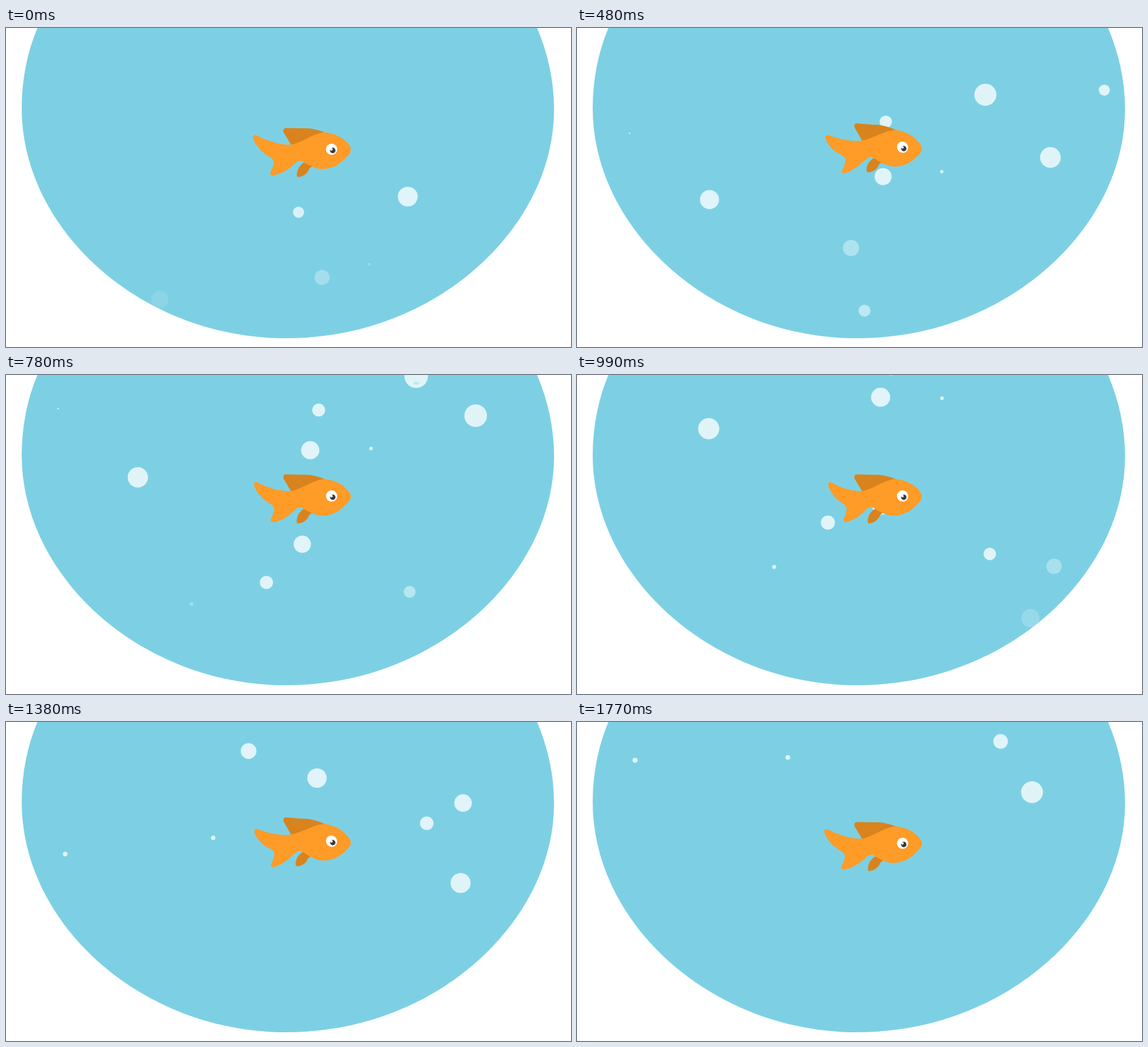
These frames come from a looping animation (900 by 509 pixels, 1800 ms). An HTML page without scripts:

```html
<!DOCTYPE html>
<html lang="en">
<head>
<meta charset="utf-8">
<title>Goldfish bowl</title>
<style>
  @property --t {
    syntax: "<number>";
    inherits: true;
    initial-value: 0;
  }

  html, body {
    margin: 0;
    width: 100%;
    height: 100%;
    overflow: hidden;
    background: #fff;
  }

  /* --t is the clock in ms; every position below is a function of it */
  svg {
    display: block;
    width: 100%;
    height: 100%;
    animation: clock 1800ms steps(60) -2ms infinite;
  }
  @keyframes clock { from { --t: 0 } to { --t: 1800 } }

  /* Bubbles: a steady rise (v) plus a sideways push (a, c) that dies away.
     s = time at which r and o hold, x/y = resting line, k = decay time */
  .bubbles > * {
    --k: 380;
    --age: calc(var(--t) - var(--s));
    --push: exp(-1 * var(--age) / var(--k));
    cx: calc(1px * (var(--x) + var(--a) * var(--push)));
    cy: calc(1px * (var(--y) - var(--v) * var(--age) + var(--c) * var(--push)));
  }
  .bubbles circle {
    fill: #fff;
    r: calc(1px * var(--r) * (1 + .00066 * var(--v) * var(--age)));
    opacity: clamp(0, var(--o) + .00625 * var(--v) * var(--age), .76);
  }
  .glint {
    fill: #c3e8f1;
    transform: translateY(11px);
    opacity: clamp(0, (var(--t) - 750) / 30, 1);
  }

  /* Fish: the middle lifts (--lift) while nose and tail tip hold; the tail sways */
  .fish {
    --lift: calc(3.5 - 3.5 * cos(6.2832 * (var(--t) / 900 + .02)));
    --beat: calc(var(--t) / 450 + .14 * sin(3.1416 * var(--t) / 1800));
    --sway: calc(4.25 - 4.25 * cos(6.2832 * var(--beat)));
    --sx: calc(1 - var(--sway) / 62);
    fill: #ff9b27;
  }
  .body, .tail { transform-origin: 0 0; }
  .body {
    transform: matrix(1, calc(.0085 * var(--lift)), 0, 1, 0, calc(-4.875 * var(--lift)));
  }
  .tail {
    transform: matrix(var(--sx), calc(-.01625 * var(--lift)), 0, 1,
      calc(455 * (1 - var(--sx))), calc(6.386 * var(--lift)));
  }
  .fin { fill: #d9831e; }
  .flipper { translate: calc(-.3px * var(--lift)) calc(-.2px * var(--lift)); }
</style>
</head>
<body>
<svg viewBox="0 0 900 509" preserveAspectRatio="none">
  <path fill="#7dd0e4" d="M50 0C34 38 25 82 25 128C25 321 214 495 447 495C684 495 873 319 873 130C873 84 863 40 846 0Z"/>

  <g class="bubbles">
    <circle style="--s:0;--x:657;--a:-17;--y:283.5;--c:-14.5;--v:.357;--k:500;--r:15.8;--o:1"/>
    <ellipse class="glint" rx="4.5" ry="2.5" style="--s:0;--x:657;--a:-17;--y:283.5;--c:-14.5;--v:.357;--k:500"/>
    <circle style="--s:0;--x:504;--a:-38;--y:306.5;--c:-12.5;--v:.3187;--k:420;--r:8.9;--o:.7"/>
    <circle style="--s:0;--x:482.5;--a:21;--y:448;--c:-50;--v:.414;--k:340;--r:12;--o:.3"/>
    <circle style="--s:0;--x:581.5;--a:-3;--y:422;--c:-45;--v:.388;--k:250;--r:2.3;--o:.25"/>
    <circle style="--s:0;--x:209.8;--a:35.3;--y:452;--c:-19;--v:.37;--k:145;--r:13.6;--o:.12"/>
    <circle style="--s:210;--x:740;--a:23;--y:372;--c:-45;--v:.5106;--k:550;--r:15.1;--o:.74"/>
    <circle style="--s:210;--x:841;--a:-2;--y:225;--c:-14;--v:.44;--k:400;--r:8.2;--o:.8"/>
    <circle style="--s:210;--x:82.6;--a:2.9;--y:276.4;--c:-8.4;--v:.389;--k:300;--r:1.1;--o:.8"/>
    <circle style="--s:480;--x:379;--a:79;--y:512;--c:-61;--v:.511;--r:9.6;--o:.5"/>
    <circle style="--s:480;--x:501.5;--a:-65;--y:376.3;--c:-25.3;--v:.316;--r:13;--o:.38"/>
    <circle style="--s:780;--x:339;--a:-43.5;--y:393;--c:-27.5;--v:.3378;--r:3.1;--o:.28"/>
    <circle style="--s:780;--x:677.3;--a:-34.3;--y:373.6;--c:-27.6;--v:.344;--r:9.5;--o:.45"/>
    <circle style="--s:1200;--x:708.7;--a:30.3;--y:233;--c:-20;--v:.505;--k:400;--r:13.2;--o:1"/>
    <circle style="--s:1200;--x:725.2;--a:-1.7;--y:339.5;--c:-19.5;--v:.3915;--r:15.2;--o:.72"/>
    <circle style="--s:1200;--x:91.3;--a:4.7;--y:287;--c:-9;--v:.393;--r:3.5;--o:.8"/>
  </g>

  <g class="fish">
    <g class="body">
      <path class="fin" d="M455 188L442.5 167C440.5 162 443 159 447 159.5C458 160 470 160 480 160C490 160.5 498 163 508 166.5L480 182Z"/>
      <path class="fin flipper" d="M474 215C466 221 463 228 463.5 236C464 238.5 467 238 470 237C476 235 480 231 482 227C483 224 485 222 488 221L484 214Z"/>
    </g>
    <path class="tail" d="M455.5 186.3C441 187 425 182.5 411 177C407 175.3 403 173.2 399.5 171.5C396 170 392 173 394 177C398 188 408 199 419 205C426 209 428 213 426 218C425 223 423 227 421 230C420 234 423 236 427 235C437 233 446.5 228 455.5 220.5Z"/>
    <g class="body">
      <path d="M454.5 186.4C475 181 488 169 507 166.3C519 167.5 530 171.5 537 177C544 182.5 549.5 189.5 549.5 194C549.5 200 541 208 535 213C526 221 514 225 504 225C494 225 485 220 478 216.5C473 212.5 468 210 464 213C461 215 459 217.5 454.5 221.3Z"/>
      <circle cx="518.6" cy="193.5" r="9" fill="#fff"/>
      <circle cx="520.5" cy="195.4" r="4.3" fill="#373b40"/>
      <circle cx="518.4" cy="193.6" r="2.1" fill="#fff"/>
    </g>
  </g>
</svg>
</body>
</html>
```
